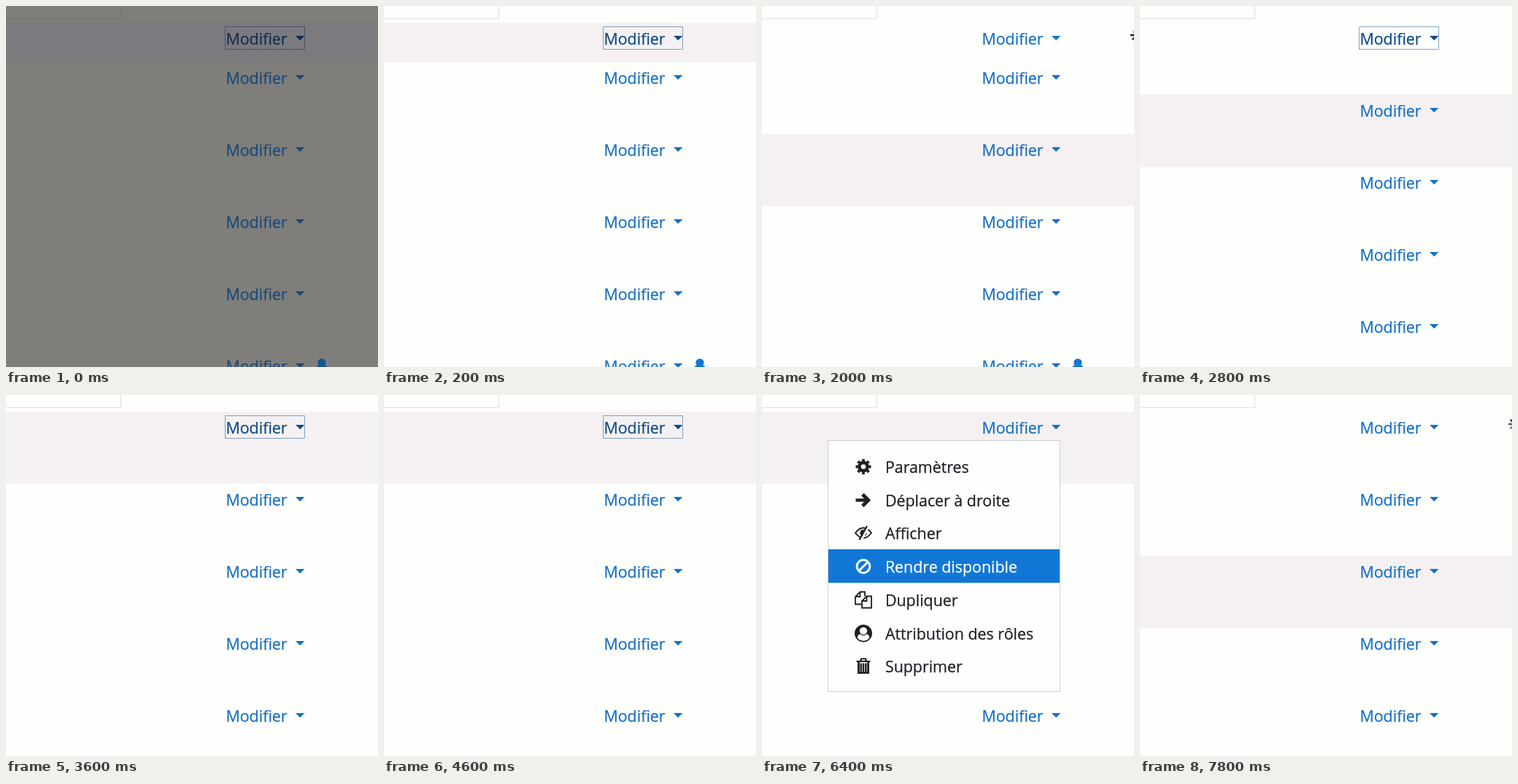
An HTML page that plays this animation: 510x496 px, repeating every 8000 ms.

```html
<!DOCTYPE html>
<html lang="fr">
<head>
<meta charset="utf-8">
<title>Menu Modifier</title>
<style>
html, body { margin: 0; width: 100%; height: 100%; overflow: hidden; }
svg {
  display: block; width: 510px; height: 496px; background: var(--bg);
  --bg: #fefefc; --band: #f5f1f3; --line: #dededd;
  --link: #1671c5; --focus: #0f4c88; --user: #1177d1;
}
svg.dim {
  --bg: #7f7e7a; --band: #7b7a7f; --line: #71706d;
  --link: #194a7b; --focus: #12304f; --user: #155592;
}
text {
  font: 21.4px "Open Sans", "Noto Sans", sans-serif; font-variant-ligatures: none;
  stroke-width: .25px;
}
.link { fill: var(--link); }
.link text { stroke: var(--link); }
.link.on { fill: var(--focus); }
.link.on text { stroke: var(--focus); }
.item { color: #1d2125; --under: #fff; }
.item.on { color: #fff; --under: #1177d6; }
.item text, .item g { fill: currentColor; }
.item text { stroke: currentColor; }
.item .o { fill: none; stroke: currentColor; }
.item .cut { fill: var(--under); }
.item .bar { fill: none; }
.item.on .bar { fill: #1177d6; }
</style>
</head>
<body>
<svg viewBox="0 0 510 496">
  <rect id="band" width="510" fill="var(--band)"/>
  <path d="M0 17.5H157.5V0" fill="none" stroke="var(--line)"/>
  <g id="rows"></g>
  <g id="user" fill="var(--user)">
    <circle cx="433" cy="490" r="5.6"/>
    <path d="M425 500Q425 493.5 429 493.5Q433 497 437 493.5Q441 493.5 441 500Z"/>
  </g>
  <rect id="ring" x="300.5" y="28.5" width="109" height="31" fill="none" stroke="var(--focus)"
    stroke-dasharray="1 1" stroke-dashoffset=".5"/>
  <g id="menu"></g>
  <g id="spin" stroke-width="2.4" stroke-linecap="round"></g>
</svg>
<script>
const $ = id => document.getElementById(id);
const show = (el, on) => { el.style.display = on ? "" : "none"; };
const LOOP = 8000;

const shortTops = [23, 77, 176, 275, 374, 473];
const tallTops = [23, 122, 221, 320, 419];

const eye = `<path class="o" stroke-width="2" d="M-11 0Q0-14 11 0Q0 14-11 0Z"/><circle r="4.6"/>`;
const icons = {
  gear: `<circle class="o" r="5.6" stroke-width="4.6"/>
    <circle class="o" r="8.9" stroke-width="3.2" pathLength="80" stroke-dasharray="5.4 4.6" stroke-dashoffset="2.7"/>`,
  arrow: `<path class="o" stroke-width="4.4" d="M-10.5 0H6"/>
    <path class="o" stroke-width="4.8" d="M-1.2-8L6.8 0L-1.2 8"/>`,
  eye,
  hidden: eye + `<path d="M-3 10L7-9" stroke="var(--under)" stroke-width="3"/>
    <path class="o" stroke-width="2.2" d="M-5.5 9.5L5-9.5"/>`,
  ban: `<circle class="o" r="8.9" stroke-width="3"/><path class="o" stroke-width="3" d="M-6 6L6-6"/>`,
  copy: `<path class="o" stroke-width="1.8" d="M-2 6H-11V-4.5L-4.5-11H2V-5M-4.5-11V-4.5H-11M-2 11V1.5L4.5-5H11V11ZM4.5-5V1.5H-2"/>`,
  role: `<circle r="12"/><circle class="cut" cy="-3.4" r="5.2"/>
    <path class="cut" d="M-8.4 6Q-7.5 1.3-4.8.9Q0 5.2 4.8.9Q7.5 1.3 8.4 6Q5 10.3 0 10.3T-8.4 6Z"/>`,
  trash: `<path class="o" stroke-width="2.2" d="M-9.5-6.5H9.5M-4-7L-3-10H3L4-7"/>
    <path class="o" stroke-width="2.8" d="M-6.6-6V9.2H6.6V-6"/>
    <path class="o" stroke-width="2.4" d="M-3.3-4V8M0-4V8M3.3-4V8"/>`
};

const head = [["gear", "Paramètres"], ["arrow", "Déplacer à droite"]];
const tail = [["copy", "Dupliquer"], ["role", "Attribution des rôles"], ["trash", "Supprimer"]];
const menus = [
  [...head, ["eye", "Cacher"], ...tail],
  [...head, ["hidden", "Afficher"], ["ban", "Rendre disponible"], ...tail]
];

// Start, tall first row, lit row, focused, menu (-2 closed, -1 open, else lit item), busy
const steps = [
  [0, 0, 0, 1, -2, 0],
  [400, 0, 0, 1, -1, 0],
  [600, 0, 0, 1, 0, 0],
  [800, 0, 0, 1, 1, 0],
  [1000, 0, 0, 1, 2, 0],
  [1200, 0, 0, 0, 2, 0],
  [1400, 0, 2, 0, -2, 1],
  [2800, 1, 1, 1, -2, 0],
  [3400, 1, 0, 1, -2, 0],
  [5400, 1, 0, 1, -1, 0],
  [5600, 1, 0, 1, 1, 0],
  [5800, 1, 0, 1, 2, 0],
  [6000, 1, 0, 1, 3, 0],
  [6400, 1, 0, 0, 3, 0],
  [6600, 1, 2, 0, -2, 1]
];

function drawRows(tops, focused) {
  $("rows").innerHTML = tops.map((top, i) => `
    <g class="link ${i === 0 && focused ? "on" : ""}" transform="translate(0 ${top})">
      <text x="301.4" y="30">Modifier</text><path d="M397 18H409.4L403.2 24.2Z"/>
    </g>`).join("");
}

function drawMenu(items, lit) {
  const pitch = 45.75;
  const height = 25 + items.length * pitch;
  $("menu").innerHTML = `<rect x="90.5" y="62.5" width="318" height="${Math.round(height)}" fill="#fefefe" stroke="#cfcfcf"/>` +
    items.map(([icon, label], i) => {
      const mid = Math.round(98.8 + i * pitch);
      return `<g class="item ${i === lit ? "on" : ""}" transform="translate(0 ${mid})">
        <rect class="bar" x="91" y="-24" width="317" height="46"/>
        <g transform="translate(139 -.5)">${icons[icon]}</g>
        <text x="168.9" y="8">${label}</text></g>`;
    }).join("");
}

function drawSpinner(time) {
  const lead = Math.floor((time - 2000) / 100) + 4;
  let spokes = "";
  for (let i = 0; i < 8; i++) {
    const age = ((lead - i) % 8 + 8) % 8;
    const shade = Math.min(205, 25 + age * 32);
    spokes += `<path d="M4.5 0H8" stroke="rgb(${shade},${shade},${shade})"
      transform="translate(514 40) rotate(${i * 45})"/>`;
  }
  $("spin").innerHTML = spokes;
}

let current = null;
function render(time) {
  const step = steps.findLast(s => s[0] <= time);
  const [, tall, row, focused, item, busy] = step;
  document.querySelector("svg").classList.toggle("dim", time < 200);
  if (step !== current) {
    current = step;
    const tops = tall ? tallTops : shortTops;
    drawRows(tops, focused);
    $("band").setAttribute("y", tops[row]);
    $("band").setAttribute("height", tops[row + 1] - tops[row]);
    show($("user"), !tall);
    show($("ring"), focused);
    show($("menu"), item > -2);
    show($("spin"), busy);
    if (item > -2) drawMenu(menus[tall], item);
  }
  if (busy) drawSpinner(Math.floor(time / 200) * 200);
}

const start = performance.now();
function tick() {
  render((performance.now() - start) % LOOP);
  requestAnimationFrame(tick);
}
tick();
</script>
</body>
</html>
```
